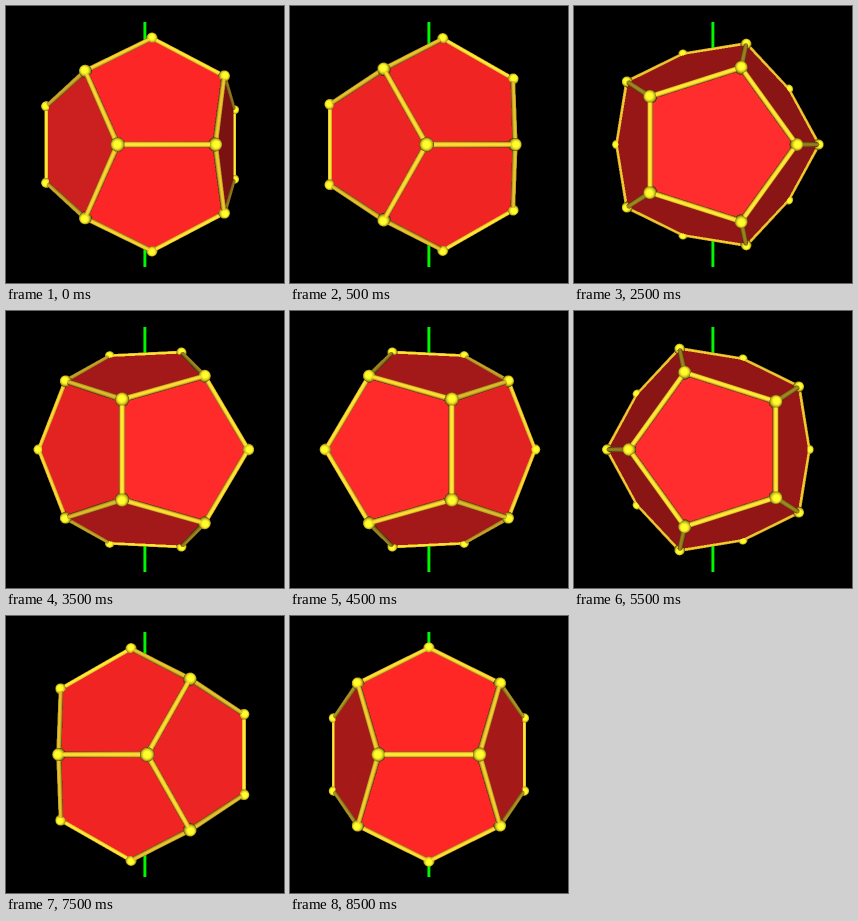
Recreate the animation shown at these times as an HTML page with a canvas. Size 278 by 277 pixels, loop 9000 ms.

```html
<!DOCTYPE html>
<html lang="en">
<head>
<meta charset="utf-8">
<title>Turning dodecahedron</title>
<style>
  html, body { margin: 0; width: 100%; height: 100%; overflow: hidden; background: #000; }
  canvas { display: block; width: 100vw; height: 100vh; }
</style>
</head>
<body>
<canvas id="stage" width="278" height="277"></canvas>
<script>
const W = 278, H = 277, SS = 2, SW = W * SS, SH = H * SS;
const CX = 138.9, CY = 138.5, FOCAL = 340, DIST = 5.8;
const STEP_MS = 500, STEPS = 18;
const BALL = 0.087, TUBE = 0.037, AXIS = 0.029, AXIS_END = 2.083;
const RED = [1, 0.15, 0.15], YELLOW = [1, 0.93, 0.15], GOLD = [0.96, 0.8, 0.18], GREEN = [0, 0.9, 0];

const ctx = document.getElementById('stage').getContext('2d');
const depth = new Float32Array(SW * SH);
const color = new Uint8ClampedArray(SW * SH * 3);

const dot = (a, b) => a[0] * b[0] + a[1] * b[1] + a[2] * b[2];
const sub = (a, b) => a.map((v, i) => v - b[i]);

// Points (±a, ±b, 0) in all three cyclic orders
function cyclic(a, b) {
  const out = [];
  for (const s of [1, -1]) for (const t of [1, -1]) {
    const x = a * s, y = b * t;
    out.push([x, y, 0], [0, x, y], [y, 0, x]);
  }
  return out;
}

const PHI = (1 + Math.sqrt(5)) / 2;
const NORM = Math.hypot(1, PHI);
const verts = cyclic(PHI, 1 / PHI);
for (const x of [1, -1]) for (const y of [1, -1]) for (const z of [1, -1]) verts.push([x, y, z]);
const normals = cyclic(1 / NORM, PHI / NORM);
const INRADIUS = PHI * PHI / NORM;

const edges = [];
verts.forEach((p, i) => verts.forEach((q, j) => {
  if (j > i && Math.hypot(...sub(p, q)) < 1.3) edges.push([i, j]);
}));

function project(p) {
  const s = FOCAL / (DIST - p[2]);
  return [CX + p[0] * s, CY - p[1] * s];
}

// Trace the rays in a box; hit(dir) gives [distance, normal z] or null
function trace(points, margin, tint, hit) {
  const px = points.map(project);
  const xs = px.map(p => p[0]), ys = px.map(p => p[1]);
  const x0 = Math.max(0, Math.floor((Math.min(...xs) - margin) * SS));
  const x1 = Math.min(SW, Math.ceil((Math.max(...xs) + margin) * SS));
  const y0 = Math.max(0, Math.floor((Math.min(...ys) - margin) * SS));
  const y1 = Math.min(SH, Math.ceil((Math.max(...ys) + margin) * SS));
  for (let j = y0; j < y1; j++) for (let i = x0; i < x1; i++) {
    const dir = [((i + 0.5) / SS - CX) / FOCAL, (CY - (j + 0.5) / SS) / FOCAL, -1];
    const h = hit(dir), k = j * SW + i;
    if (!h || h[0] >= depth[k]) continue;
    depth[k] = h[0];
    const light = 20 + 277 * Math.max(0, h[1]);
    for (let c = 0; c < 3; c++) color[k * 3 + c] = light * tint[c];
  }
}

function nearRoot(a, b, c) {
  const d = b * b - a * c;
  return d < 0 ? null : (-b - Math.sqrt(d)) / a;
}

function ball(p, r) {
  const o = [-p[0], -p[1], DIST - p[2]], c = dot(o, o) - r * r;
  trace([p], 10, YELLOW, dir => {
    const t = nearRoot(dot(dir, dir), dot(o, dir), c);
    return t === null ? null : [t, (o[2] - t) / r];
  });
}

function tube(p, q, r, tint) {
  const len = Math.hypot(...sub(q, p));
  const e = sub(q, p).map(v => v / len);
  const o = [-p[0], -p[1], DIST - p[2]], oe = dot(o, e);
  const c = dot(o, o) - oe * oe - r * r;
  trace([p, q], 5, tint, dir => {
    const de = dot(dir, e);
    const t = nearRoot(dot(dir, dir) - de * de, dot(o, dir) - oe * de, c);
    if (t === null) return null;
    const s = oe + t * de;
    return s < 0 || s > len ? null : [t, (o[2] - t - s * e[2]) / r];
  });
}

function solid(points, faces) {
  trace(points, 1, RED, dir => {
    let enter = 0, leave = Infinity, nz = 0;
    for (const n of faces) {
      const nd = dot(n, dir), t = (INRADIUS - n[2] * DIST) / nd;
      if (nd < 0) {
        if (t > enter) { enter = t; nz = n[2]; }
      } else if (t < leave) leave = t;
    }
    return enter < leave ? [enter, nz] : null;
  });
}

function render(angle) {
  const c = Math.cos(angle), s = Math.sin(angle);
  const turn = ([x, y, z]) => [x * c + z * s, y, z * c - x * s];
  const pts = verts.map(turn);
  depth.fill(1e9);
  color.fill(0);
  solid(pts, normals.map(turn));
  tube([0, -AXIS_END, 0], [0, AXIS_END, 0], AXIS, GREEN);
  for (const [i, j] of edges) tube(pts[i], pts[j], TUBE, GOLD);
  for (const p of pts) ball(p, BALL);

  const img = ctx.createImageData(W, H);
  for (let y = 0; y < H; y++) for (let x = 0; x < W; x++) {
    const k = (y * W + x) * 4;
    for (let ch = 0; ch < 3; ch++) {
      let sum = 0;
      for (let v = 0; v < SS; v++) for (let u = 0; u < SS; u++) {
        sum += color[((y * SS + v) * SW + x * SS + u) * 3 + ch];
      }
      img.data[k + ch] = sum / (SS * SS);
    }
    img.data[k + 3] = 255;
  }
  return img;
}

// Half a turn brings the solid back onto itself
const views = [];
const view = n => views[n] || (views[n] = render((n + 1) * Math.PI / STEPS));
for (let n = 0; n < STEPS; n++) view(n);

const start = performance.now();
let shown = -1;
function tick() {
  const n = Math.floor((performance.now() - start) / STEP_MS) % STEPS;
  if (n !== shown) ctx.putImageData(view(n), 0, 0);
  shown = n;
  requestAnimationFrame(tick);
}
tick();
</script>
</body>
</html>
```
